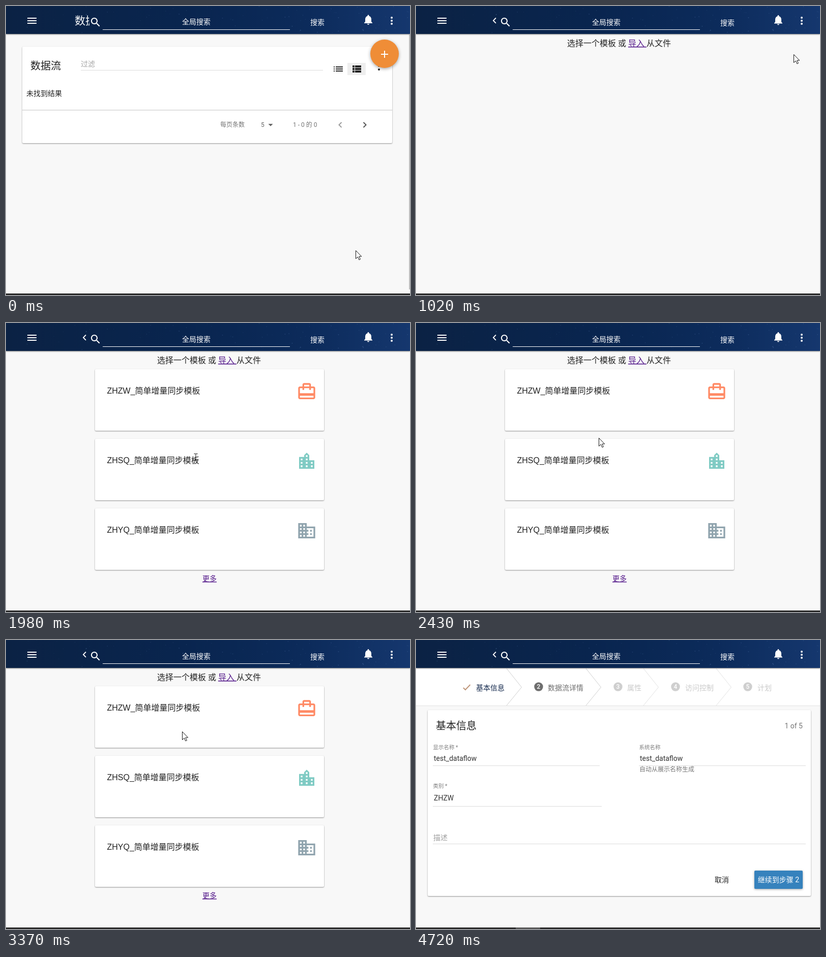
Recreate the animation shown at these times as an HTML page. Size 794 by 569 pixels, loop 5530 ms.

```html
<!DOCTYPE html>
<html lang="zh-CN">
<head>
<meta charset="utf-8">
<title>数据流</title>
<style>
html, body { margin: 0; width: 100%; height: 100%; overflow: hidden; background: #f8f8f8; }
svg { display: block; width: 794px; height: 569px; }
text { font-family: Roboto, "Noto Sans CJK SC", "Noto Sans CJK", sans-serif; white-space: pre; }
.arial { font-family: "Liberation Sans", "Noto Sans CJK SC", "Noto Sans CJK", sans-serif; }
.card { fill: #fff; filter: drop-shadow(0 1px 1.2px rgba(0,0,0,.42)); }
.link { fill: #551a8b; text-decoration: underline; }
</style>
</head>
<body>
<svg id="stage" viewBox="0 0 794 569" xmlns="http://www.w3.org/2000/svg"></svg>
<script>
const LOOP = 5530;
const INK = '#222', MUTED = '#9e9e9e', RULE = '#dcdcdc';

const ICONS = {
  menu: 'M3 18h18v-2H3v2zm0-5h18v-2H3v2zm0-7v2h18V6H3z',
  search: 'M15.5 14h-.79l-.28-.27C15.41 12.59 16 11.11 16 9.5 16 5.91 13.09 3 9.5 3S3 5.91 3 9.5 5.91 16 9.5 16c1.61 0 3.09-.59 4.23-1.57l.27.28v.79l5 4.99L20.49 19l-4.99-5zm-6 0C7.01 14 5 11.99 5 9.5S7.01 5 9.5 5 14 7.01 14 9.5 11.99 14 9.5 14z',
  bell: 'M12 22c1.1 0 2-.9 2-2h-4c0 1.1.89 2 2 2zm6-6v-5c0-3.07-1.64-5.64-4.5-6.32V4c0-.83-.67-1.5-1.5-1.5s-1.5.67-1.5 1.5v.68C7.63 5.36 6 7.92 6 11v5l-2 2v1h16v-1l-2-2z',
  list: 'M3 13h2v-2H3v2zm0 4h2v-2H3v2zm0-8h2V7H3v2zm4 4h14v-2H7v2zm0 4h14v-2H7v2zM7 7v2h14V7H7z',
  rows: 'M4 14h4v-4H4v4zm0 5h4v-4H4v4zM4 9h4V5H4v4zm5 5h12v-4H9v4zm0 5h12v-4H9v4zM9 5v4h12V5H9z',
  bag: 'M20 6h-3V4c0-1.11-.89-2-2-2H9c-1.11 0-2 .89-2 2v2H4c-1.11 0-2 .89-2 2v11c0 1.11.89 2 2 2h16c1.11 0 2-.89 2-2V8c0-1.11-.89-2-2-2zM9 4h6v2H9V4zm11 15H4v-2h16v2zm0-5H4V8h3v2h2V8h6v2h2V8h3v6z',
  city: 'M15 11V5l-3-3-3 3v2H3v14h18V11h-6zm-8 8H5v-2h2v2zm0-4H5v-2h2v2zm0-4H5V9h2v2zm6 8h-2v-2h2v2zm0-4h-2v-2h2v2zm0-4h-2V9h2v2zm0-4h-2V5h2v2zm6 12h-2v-2h2v2zm0-4h-2v-2h2v2z',
  office: 'M12 7V3H2v18h20V7H12zM6 19H4v-2h2v2zm0-4H4v-2h2v2zm0-4H4V9h2v2zm0-4H4V5h2v2zm4 12H8v-2h2v2zm0-4H8v-2h2v2zm0-4H8V9h2v2zm0-4H8V5h2v2zm10 12h-8v-2h2v-2h-2v-2h2v-2h-2V9h8v10zm-2-8h-2v2h2v-2zm0 4h-2v2h2v-2z'
};

// Text is placed by its left edge and the middle of its line.
const text = (x, mid, size, str, fill = INK, attrs = '') =>
  `<text x="${x}" y="${mid + size * .37}" font-size="${size}" fill="${fill}" ${attrs}>${str}</text>`;
const rect = (x, y, w, h, fill, attrs = '') =>
  `<rect x="${x}" y="${y}" width="${w}" height="${h}" fill="${fill}" ${attrs}/>`;
const card = (x, y, w, h) => rect(x, y, w, h, '#fff', 'rx="2" class="card"');
const icon = (name, x, y, fill, scale = 1) =>
  `<path d="${ICONS[name]}" fill="${fill}" transform="translate(${x} ${y}) scale(${scale})"/>`;
const line = (d, stroke, width = 1, attrs = '') =>
  `<path d="${d}" fill="none" stroke="${stroke}" stroke-width="${width}" ${attrs}/>`;
const dots = (x, ys, fill) => ys.map(y => `<circle cx="${x}" cy="${y}" r="2" fill="${fill}"/>`).join('');
const group = (id, body, attrs = '') => `<g id="${id}" ${attrs}>${body}</g>`;

function stars() {
  let seed = 7, out = '';
  const rnd = () => (seed = seed * 16807 % 2147483647) / 2147483647;
  for (let i = 0; i < 110; i++)
    out += `<circle cx="${rnd() * 794}" cy="${rnd() * 54}" r="${.4 + rnd() * .6}" fill="#7fa5dc" opacity="${.05 + rnd() * .22}"/>`;
  return out;
}

const header =
  rect(0, 0, 794, 55, 'url(#sky)', 'style="filter:drop-shadow(0 1px 1px rgba(0,0,0,.5))"') + stars() +
  icon('menu', 39, 17, '#fff') + icon('search', 164, 20, '#fff') +
  rect(190, 46, 368, 1, '#fff') +
  group('searchText', text(346, 31, 14, '全局搜索', '#fff') + text(598, 32, 14, '搜索', '#fff')) +
  group('bell', icon('bell', 700, 15, '#fff')) + dots(758, [23, 29, 35], '#fff') +
  group('listTitle', text(135, 28, 21, '数据流', '#fff'), 'clip-path="url(#titleClip)"') +
  group('back', line('M157 23.5l-5 5.2 5 5.2', '#fff', 1.9));

const listPage =
  rect(792, 56, 2, 502, '#c1c1c1') +
  card(32, 80, 727, 190) +
  text(48, 118, 20, '数据流') + text(147, 114, 14, '过滤', '#a6a6a6') +
  rect(147, 126, 476, 1, RULE) +
  rect(671, 112, 36, 24, '#eee') + icon('list', 641, 112, INK) + icon('rows', 677, 112, INK) +
  dots(733, [118, 125], INK) +
  text(40, 172, 14, '未找到结果') + rect(32, 204, 727, 2, '#e0e0e0') +
  text(421, 234, 12, '每页条数', '#757575') + text(501, 234, 12, '5', '#666') +
  '<path d="M515.5 232h9l-4.500 4.800z" fill="#666"/>' +
  text(564, 234, 12, '1 - 0 的 0', '#757575') +
  line('M659.500 229l-5 5 5 5', '#9c9c9c', 2) + line('M702.500 229l5 5-5 5', '#555', 2) +
  '<circle id="fab" cx="744" cy="94" r="28" style="filter:drop-shadow(0 2px 3px rgba(0,0,0,.35))"/>' +
  line('M737 95h14M744 88v14', '#fff', 2);

const templates = [['ZHZW', 'bag', '#ff8a65'], ['ZHSQ', 'city', '#80cbc4'], ['ZHYQ', 'office', '#90a4ae']];
const templateCards = templates.map(([code, glyph, color], i) => {
  const y = 91 + 137 * i;
  return card(175, y, 450, 121) +
    text(198.5, y + 42.500, 16, code + '_简单增量同步模板', INK, 'class="arial"') +
    icon(glyph, 571, y + 24, color, 5 / 3);
}).join('') + text(386, 503, 14, '更多', '#551a8b', 'class="link"');
const intro = text(297, 73, 16, '选择一个模板 或 <tspan class="link">导入 </tspan>从文件');

const steps = [[99, 118, '基本信息'], [241, 259, '数据流详情'], [397, 415, '属性'], [510, 529, '访问控制'], [652, 671, '计划']];
const stepper = rect(0, 56, 794, 73, '#fff') + rect(0, 129, 794, 1, '#e2e2e2') +
  steps.map(([cx, x, name], i) =>
    group('badge' + i, `<circle cx="${cx}" cy="92" r="8.700"/>` +
      text(cx, 92, 12, i + 1, '#fff', 'text-anchor="middle" font-weight="500"')) +
    group('step' + i, text(x, 94, 14, name, 'inherit'))).join('') +
  group('check', line('M93 94l4 4 9.500-10', '#bf977b', 2));
const chevrons = [178, 334, 447, 590].map((x, i) =>
  line(`M${x} 56l29.500 37-29.500 36`, i ? '#e2e2e2' : '#cfcfcf', 1, `id="chevron${i}"`)).join('');

const floating = [[34, 235, '显示名称 *'], [439, 235, '系统名称'], [34, 311, '类别 *']];
const form = card(23, 138, 753, 366) +
  text(39, 169, 20, '基本信息') + text(760, 169, 14, '1 of 5', '#757575', 'text-anchor="end"') +
  [[33, 247, 328], [438, 247, 328], [33, 327, 332], [33, 401, 733]].map(([x, y, w]) => rect(x, y, w, 1, RULE)).join('') +
  floating.map(([, , name], i) => group('label' + i, text(0, 0, 14, name, 'inherit'))).join('') +
  text(34, 389, 14, '描述', MUTED) + text(439, 254.500, 12, '自动从展示名称生成', '#777') +
  group('values', text(35, 233, 14, 'test_dataflow', '#333') +
    text(440, 233, 14, 'test_dataflow', '#333') + text(35, 311, 14, 'ZHZW', '#333')) +
  text(587, 472, 14, '取消') +
  rect(665, 454, 95, 36, '#e0e0e0', 'rx="2" id="button"') +
  text(712.500, 472, 14, '继续到步骤 2', '#a6a6a6', 'text-anchor="middle" id="buttonText"');

const outline = 'fill="#fff" stroke="#111" stroke-linejoin="round"';
const pointers =
  `<path id="arrow" d="M.5.5v16l3.800-3.500 2.600 5.800 2.500-1.100-2.600-5.600h4.900z" ${outline}/>` +
  group('hand', `<path d="M-2.500 1q0-1.800 1.600-1.800T.7 1v7q3-1 3.400 1 2.600-.7 3 1.200 2.400-.4 2.400 2v4q0 2.500-1.800 4.300v2.200h-8v-2.200q-3.500-4-6-7.500-.8-2.500 1.600-2.300l2.200 2.300z" ${outline} stroke-width="1.200"/>` +
    line('M.8 8v4M4.100 9v3.500M7 10.500v2.500', '#111')) +
  line('M-3.500-6.500h3l.500.5.500-.5h3M0-6v12M-3.500 6.500h3l.500-.5.500.5h3', '#111', 1, 'id="ibeam"');

const stage = document.getElementById('stage');
stage.innerHTML = `<defs>
  <linearGradient id="sky"><stop offset="0" stop-color="#0b2244"/><stop offset=".45" stop-color="#09254f"/>
    <stop offset=".75" stop-color="#0c2b5b"/><stop offset="1" stop-color="#15376e"/></linearGradient>
  <clipPath id="titleClip"><rect x="130" y="10" width="34" height="40"/></clipPath></defs>` +
  rect(0, 0, 794, 569, '#f8f8f8') +
  group('listPage', listPage) + group('intro', intro) + group('templateCards', templateCards) +
  group('stepper', stepper) + group('chevrons', chevrons) + group('form', form) + header +
  rect(0, 566, 794, 3, '#2b2b2b') + rect(196, 566, 48, 3, '#5a5a5a', 'id="scroll"') + pointers;

const nodes = {};
stage.querySelectorAll('[id]').forEach(n => nodes[n.id] = n);
const set = (id, name, value) => nodes[id].setAttribute(name, value);
const fade = (id, value) => set(id, 'opacity', value);
const ramp = (t, from, to) => Math.min(1, Math.max(0, (t - from) / (to - from)));
const easeOut = p => 1 - (1 - p) ** 3;
const mix = (a, b, p) => `rgb(${a.map((v, i) => Math.round(v + (b[i] - v) * p))})`;

// Pointer path: time, x, y
const path = [[150, 687, 481], [260, 684, 430], [400, 687, 315], [530, 712, 180], [640, 741, 95],
  [1290, 742, 95], [1430, 613, 141], [1600, 490, 215], [1850, 378, 268], [1980, 373, 264],
  [2200, 368, 254], [2430, 359, 226], [2820, 346, 205], [3020, 346, 202], [3240, 346, 180]];

function pointerAt(t) {
  const next = path.findIndex(p => p[0] > t);
  if (next < 0) return path[path.length - 1].slice(1);
  if (!next) return path[0].slice(1);
  const [a, b] = [path[next - 1], path[next]], p = ramp(t, a[0], b[0]);
  return [a[1] + (b[1] - a[1]) * p, a[2] + (b[2] - a[2]) * p].map(Math.round);
}

function drawPointer(t) {
  const [x, y] = pointerAt(t);
  const overFab = t < 1000 && Math.hypot(x - 744, y - 94) < 28;
  const overText = t > 1800 && t < 2450 && y > 258;
  const shown = t >= 4480 ? '' : overFab ? 'hand' : overText ? 'ibeam' : 'arrow';
  for (const id of ['arrow', 'hand', 'ibeam']) fade(id, id === shown ? 1 : 0);
  if (shown) set(shown, 'transform', `translate(${x} ${y})`);
}

function draw(t) {
  const opened = t >= 1000, wizard = t >= 3380, done = t >= 4480;
  const fill = easeOut(ramp(t, 4470, 4720));

  fade('listPage', 1 - ramp(t, 960, 1010));
  fade('listTitle', opened ? 0 : 1);
  fade('back', opened ? 1 : 0);
  set('searchText', 'transform', `translate(0 ${opened ? 1 : 0})`);
  set('bell', 'transform', `translate(0 ${opened ? .5 : 0})`);
  set('fab', 'fill', t >= 740 && t < 830 ? '#f29a4e' : '#ef8d37');

  fade('intro', wizard ? 0 : ramp(t, 970, 1020));
  fade('templateCards', t >= 1300 && !wizard ? 1 : 0);

  fade('stepper', wizard ? 1 : 0);
  fade('chevrons', t >= 4040 ? 1 : 0);
  fade('form', t >= 4040 ? 1 : 0);
  steps.forEach((_, i) => {
    const current = i === 0 && t >= 3630, ready = i === 1 && done;
    set('badge' + i, 'fill', current ? '#0f2b5b' : ready ? '#6e6e6e' : '#cfcfcf');
    set('step' + i, 'fill', current ? '#14294d' : ready ? '#6e6e6e' : '#cacaca');
  });
  fade('badge0', done ? 0 : 1);
  fade('check', done ? 1 : 0);
  set('chevron1', 'stroke', done ? '#cfcfcf' : '#e2e2e2');

  floating.forEach(([x, y], i) => {
    set('label' + i, 'transform', `translate(${x - fill * .5} ${y - 24 * fill}) scale(${1 - .25 * fill})`);
    set('label' + i, 'fill', mix([158, 158, 158], [125, 125, 125], fill));
  });
  fade('values', done ? 1 : 0);
  set('button', 'fill', mix([224, 224, 224], [54, 130, 189], fill));
  set('button', 'style', `filter:drop-shadow(0 1px 2px rgba(0,0,0,${.35 * fill}))`);
  set('buttonText', 'fill', mix([166, 166, 166], [255, 255, 255], fill));
  fade('scroll', done ? 1 : 0);

  drawPointer(t);
}

const start = performance.now();
function tick() {
  draw((performance.now() - start) % LOOP);
  requestAnimationFrame(tick);
}
tick();
</script>
</body>
</html>
```
